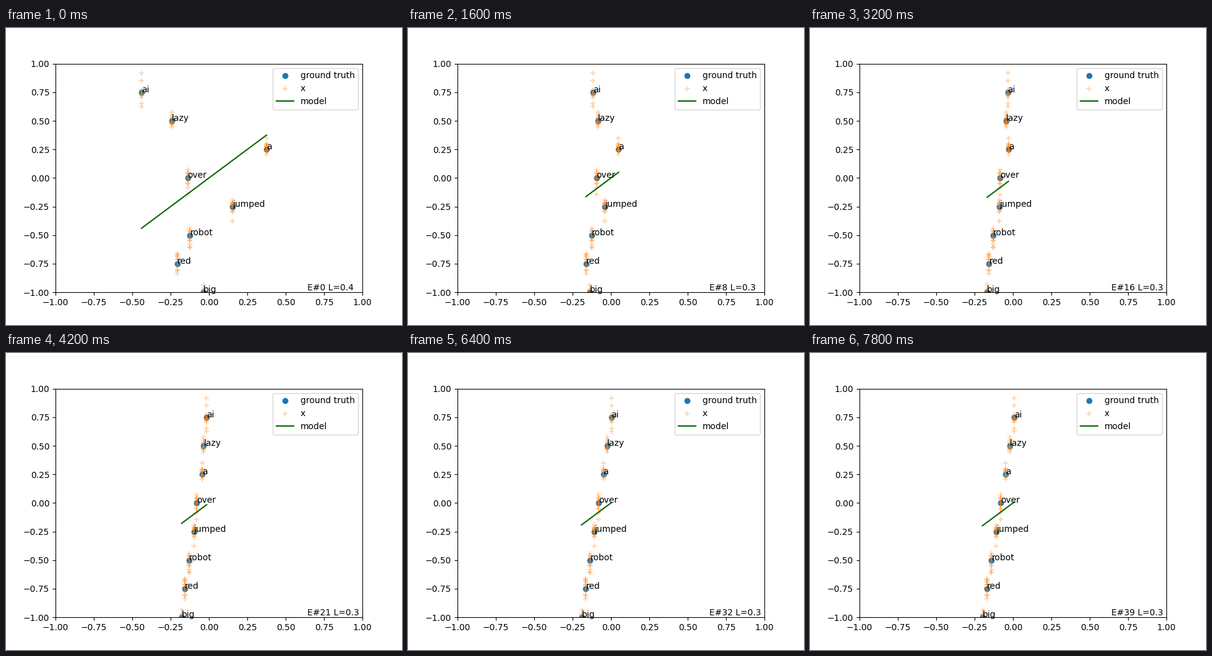
Recreate the animation shown at these times as a matplotlib script. Size 640 by 480 pixels, loop 10 s.

```python
import numpy as np
import matplotlib.pyplot as plt
from matplotlib.animation import FuncAnimation

plt.rcParams["font.family"] = "DejaVu Sans"

LAST_EPOCH = 39
HOLD = 10
SAMPLES = 12
NOISE = 0.05
DECAY = 0.84

# Each word with its untrained x, spaced evenly down the y axis
START = {"ai": -0.44, "lazy": -0.242, "a": 0.375, "over": -0.139,
         "jumped": 0.153, "robot": -0.123, "red": -0.207, "big": -0.036}
start_x = np.array(list(START.values()))
truth_y = 0.75 - 0.25 * np.arange(len(START))

rng = np.random.default_rng(3)
sample_y = np.repeat(truth_y, SAMPLES) + rng.normal(0, NOISE,
                                                    SAMPLES * len(START))


def trend(epoch):
    """Line the words settle on; it tilts slowly towards the truth."""
    return -0.08 + (0.08 + 0.001 * epoch) * truth_y


def word_x(epoch):
    return trend(epoch) + (start_x - trend(0)) * DECAY ** epoch


fig, ax = plt.subplots(figsize=(6.4, 4.8), dpi=100)
ax.set(xlim=(-1, 1), ylim=(-1, 1))
truth = ax.scatter(start_x, truth_y, label="ground truth")
noisy = ax.scatter(np.repeat(start_x, SAMPLES), sample_y, marker="+",
                   alpha=0.3, label="x")
model, = ax.plot([], [], color="darkgreen", label="model")
labels = [ax.text(x, y, word) for (word, x), y in zip(START.items(), truth_y)]
status = ax.text(0.64, -0.98, "")
ax.legend(loc="upper right")


def draw(i):
    epoch = min(i, LAST_EPOCH)
    x = word_x(epoch)
    truth.set_offsets(np.column_stack([x, truth_y]))
    noisy.set_offsets(np.column_stack([np.repeat(x, SAMPLES), sample_y]))
    ends = [x.min(), x.max()]
    model.set_data(ends, ends)
    for label, lx in zip(labels, x):
        label.set_x(lx)
    loss = np.mean((x - truth_y) ** 2)
    status.set_text(f"E#{epoch} L={loss:.1f}")
    return [truth, noisy, model, status, *labels]


anim = FuncAnimation(fig, draw, frames=LAST_EPOCH + 1 + HOLD, interval=200,
                     repeat=True, repeat_delay=0)
plt.show()
```
